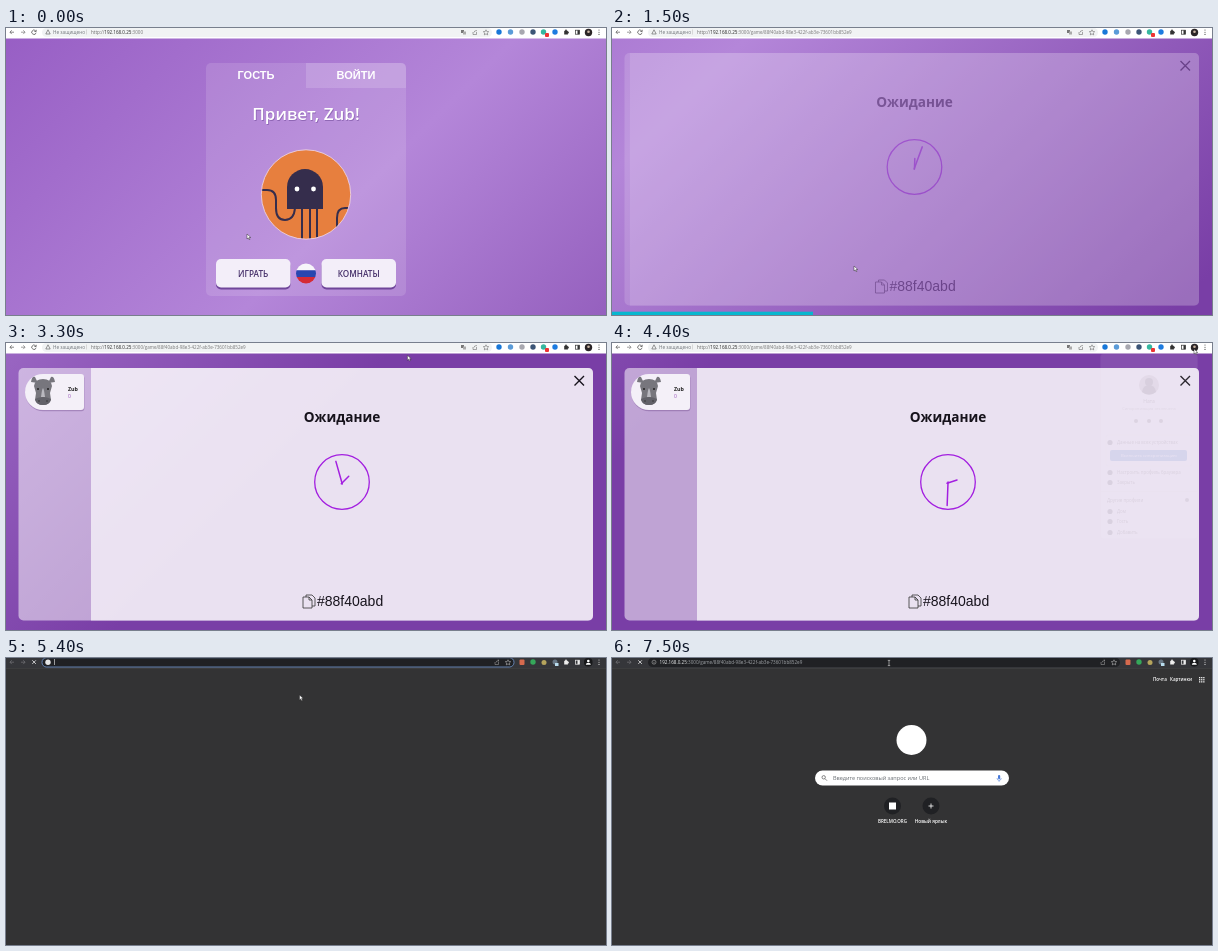
Animation, 600 px wide and 287 px high, one loop 8 s. Source, as an HTML page:

```html
<!DOCTYPE html>
<html lang="ru">
<head>
<meta charset="utf-8">
<title>Комната ожидания</title>
<style>
html, body { margin: 0; width: 100%; height: 100%; overflow: hidden; background: #333; }
svg { display: block; width: 100vw; height: 100vh; }
text { font-family: "Open Sans", "Noto Sans", sans-serif; white-space: pre; }
.arial { font-family: "Liberation Sans", sans-serif; }
</style>
</head>
<body>
<svg id="stage" viewBox="0 0 600 287"></svg>
<script>
const LOOP = 8000;
const HOST = '192.168.0.25';
const ROOM = '/game/88f40abd-98e3-422f-ab3e-73601bb852e9';
const PLAYER = 'Zub';

const text = (x, y, s, size, fill, more = '') =>
  `<text x="${x}" y="${y}" font-size="${size}" fill="${fill}" ${more}>${s}</text>`;
const rect = (x, y, w, h, fill, more = '') =>
  `<rect x="${x}" y="${y}" width="${w}" height="${h}" fill="${fill}" ${more}/>`;
const disc = (x, y, r, fill, more = '') =>
  `<circle cx="${x}" cy="${y}" r="${r}" fill="${fill}" ${more}/>`;
const line = (d, color, width = 1, more = '') =>
  `<path d="${d}" fill="none" stroke="${color}" stroke-width="${width}" ${more}/>`;
const group = (id, content, more = '') => `<g id="${id}" ${more}>${content}</g>`;
const MID = 'text-anchor="middle"';
const BOLD = 'font-weight="700"';
const SEMI = 'font-weight="600"';

const reloadIcon = color => line('M29.6 2.8A2.2 2.2 0 1 0 30.1 4.7M30.2 1.8V3.5H28.4', color, .7);
const stopIcon = color => line('M26.3 2.3l3.6 3.6M29.9 2.3l-3.6 3.6', color, .8);
const arrows = (back, next) =>
  line('M8 4.2H4M5.8 2.3L3.9 4.2 5.8 6.1', back, .7) +
  line('M15 4.2h4M17.2 2.3l1.9 1.9-1.9 1.9', next, .7);
const pageTools = color =>
  line('M489 4v2.5h3.5V4M490 4.5q0-2 3-2M491.8 1.5l1.2 1-1.2 1', color, .5);
const star = (x, color) =>
  line(`M${x} 1.8l.8 1.7 1.9.2-1.4 1.3.4 1.9-1.7-1-1.7 1 .4-1.9-1.4-1.3 1.9-.2z`, color, .5);
const menuDots = color => [2, 4.2, 6.4].map(y => disc(593, y, .55, color)).join('');
const puzzle = (x, color) => rect(x - 1.8, 2.8, 3.7, 3.7, color) + disc(x, 2.5, .9, color) + disc(x + 2, 4.5, .9, color);
const panelIcon = (x, color) => rect(x - 2, 2.2, 4, 4, 'none', `stroke="${color}" stroke-width=".7"`) + rect(x, 2.2, 2, 4, color);

function lightBar() {
  const badges = [[493, '#1877d8'], [504.5, '#5a9bd8'], [516, '#a8a8b0'], [527, '#3c5577'], [537.5, '#36b7a0'], [549, '#1d7be0']];
  return rect(0, 0, 600, 10.5, '#fff') + rect(36, 0, 450, 9, '#f1f3f4', 'rx="4.5"') +
    arrows('#555', '#777') + reloadIcon('#444') +
    line('M42 1.8l2.2 4.2h-4.4z', '#555', .6) +
    text(47, 6, 'Не защищено', 4.7, '#70757a') + rect(80, 1.5, .5, 5, '#bbb') +
    text(85, 6, `<tspan fill="#666">http://</tspan>${HOST}<tspan fill="#777">:3000</tspan><tspan id="path" fill="#777"></tspan>`, 4.55, '#222') +
    rect(455, 2, 3, 3, '#777') + rect(457, 3.5, 3, 3, '#aaa') +
    line('M467 4v2.5h3.5V4M468 4.5q0-2 3-2', '#555', .5) + star(480, '#555') +
    badges.map(([x, c]) => disc(x, 4, 2.7, c)).join('') + rect(539, 5, 4, 4, '#e33', 'rx="1"') +
    puzzle(560, '#333') + panelIcon(571.5, '#333') +
    disc(582.5, 4.5, 3.7, '#2b2527') + disc(582.5, 3.7, 1.3, '#c9b5a4') + menuDots('#444');
}

function avatar() {
  const ink = '#352d4c';
  const legs = [296, 304, 311].map(x => `M${x} 180V212`).join('');
  return `<clipPath id="round"><circle cx="300" cy="166.5" r="44.5"/></clipPath>` +
    disc(300, 166.5, 44.5, '#e77f3e') +
    `<g clip-path="url(#round)">` +
    line('M254 162h7q9 0 9 10v8q0 12 9 12t10-12M331 200v-10q0-10 8-10h6' + legs, ink, 2) +
    `<path d="M281 181V159a18 18 0 0 1 36 0V181z" fill="${ink}"/>` +
    disc(291, 161, 2.4, '#fff') + disc(307.5, 161, 2.4, '#fff') + '</g>' +
    disc(300, 166.5, 44.7, 'none', 'stroke="#f4d9dd" stroke-width=".8"');
}

function button(id, x, label) {
  return rect(x, 233, 74.5, 28.5, '#5d348a', 'rx="5" opacity=".8"') +
    rect(x, 231, 74.5, 28.5, '#f3eef9', `id="${id}" rx="5"`) +
    text(x + 37.2, 248.8, label, 8.2, '#46306a', MID + SEMI);
}

function lobby() {
  return rect(200, 35, 200, 233, '#fff', 'rx="5" opacity=".13"') +
    '<path d="M300 35h95q5 0 5 5v20H300z" fill="#fff" opacity=".15"/>' +
    text(250, 51, 'ГОСТЬ', 11, '#fff', `class="arial" ${MID}${BOLD}`) +
    text(350, 51, 'ВОЙТИ', 11, '#fff', `class="arial" ${MID}${BOLD}`) +
    text(300.6, 93, `Привет, ${PLAYER}!`, 17, '#553080', `${MID}${SEMI} opacity=".4"`) +
    text(300, 92, `Привет, ${PLAYER}!`, 17, '#fff', MID + SEMI) + avatar() +
    button('play', 210, 'ИГРАТЬ') + button('rooms', 315.5, 'КОМНАТЫ') +
    '<clipPath id="flag"><circle cx="300" cy="245.5" r="10"/></clipPath><g clip-path="url(#flag)">' +
    rect(290, 235, 20, 7.5, '#f7f5fa') + rect(290, 242.3, 20, 6.7, '#2946b0') + rect(290, 249, 20, 7, '#d52b35') + '</g>';
}

function rhino() {
  return '<g fill="#77767d"><path d="M25 39q1-6 4-5l3 6zM49 39q-1-6-4-5l-3 6z"/>' +
    '<path d="M28 43q1-7 9-7t9 7l-2 7 1 7q-2 5-8 5t-8-5l1-7z"/></g>' +
    '<path d="M35 54q1-8 2-9 1 1 2 9z" fill="#b9b8bf"/><path d="M29 56q8-4 16 0-1 6-8 6t-8-6z" fill="#626169"/>' +
    disc(32, 46, 1, '#222') + disc(42, 46, 1, '#222') + disc(33, 58, .8, '#333') + disc(41, 58, .8, '#333');
}

function game() {
  const card = 'M37 31H75q3 0 3 3V64q0 3-3 3H37a18 18 0 0 1 0-36z';
  const waiting =
    text(0, 79, 'Ожидание', 13.6, '#17131c', MID + BOLD) +
    disc(0, 139, 27.3, 'none', 'stroke="#a31fe0" stroke-width="1.3"') +
    line('M0 141V117.5', '#a31fe0', 1.5, 'id="minute" stroke-linecap="round"') +
    line('M0 141V130.5', '#a31fe0', 1.5, 'id="hour" stroke-linecap="round"') +
    line('M-36 254v-2h6l3 3v8h-3M-39 254h6l3 3v8h-9zM-33 254v3h3', '#333', .8) +
    text(-25, 263, '#88f40abd', 14, '#17131c', 'class="arial"');
  return rect(12.5, 25, 574.5, 252.5, '#fff', 'rx="5" opacity=".52"') +
    '<path id="main" fill="#fff" opacity=".68"/>' +
    group('member', `<path d="${card}" transform="translate(.4 1.3)" fill="#61397f" opacity=".35"/><path d="${card}" fill="#f4f0f8"/>` +
      rhino() + text(62, 47.5, PLAYER, 5.3, '#222', BOLD) + text(62, 54.5, '0', 5, '#9a55bb')) +
    group('waiting', waiting) + line('M568.5 33l9.5 9.5M578 33l-9.5 9.5', '#17131c', 1.4);
}

function profileMenu() {
  const row = (y, s) => disc(498, y - 1.5, 2.6, '#3c4043') + text(505, y, s, 4.4, '#333');
  return rect(488.5, 11, 97, 185, '#fff', 'rx="3" stroke="#ccc" stroke-width=".5"') +
    disc(537, 42, 10, '#a09a9d') + disc(537, 39, 4, '#2d282b') + '<path d="M530 49q1-7 7-7t7 7q-7 5-14 0z" fill="#2d282b"/>' +
    text(537, 60, 'Ната', 5, '#222', MID) + text(537, 67, 'Синхронизация отключена', 4, '#777', MID) +
    [524, 537, 549].map(x => disc(x, 78, 2, '#555')).join('') +
    rect(494, 92, 86, 31, 'none', 'rx="2" stroke="#ddd" stroke-width=".5"') +
    row(101, 'Данные на всех устройствах') + rect(498, 107, 77, 11, '#1a62c6', 'rx="2"') +
    text(537, 114, 'Включить синхронизацию', 4.3, '#fff', MID) +
    row(131, 'Настроить профиль браузера') + row(141, 'Закрыть') + rect(489, 148, 96, .5, '#ddd') +
    text(495, 159, 'Другие профили', 4.5, '#333') + disc(575, 157, 2, '#666') +
    row(170, 'Дом') + row(180, 'Гость') + row(191, 'Добавить');
}

function darkBar() {
  return rect(0, 0, 600, 10, '#35363a') + rect(0, 10, 600, .5, '#454649') + arrows('#75767a', '#75767a') +
    group('reload', reloadIcon('#ddd')) + group('stop', stopIcon('#eee')) +
    rect(36, -.3, 472, 9.3, '#202124', 'id="field" rx="4.5"') +
    pageTools('#aaa') + star(502, '#ccc') +
    rect(513.5, 1.5, 5, 5.5, '#d66a4e', 'rx="1"') + disc(527, 4, 2.7, '#35a85a') +
    disc(538, 4.5, 2.5, '#b5a45c') + disc(549, 4, 2.5, '#687785') + rect(549, 5, 3.5, 3, '#b8dcee') +
    puzzle(560, '#eee') + panelIcon(571.5, '#eee') + rect(578, 0, 8.5, 8.5, '#17181a', 'rx="4"') +
    disc(582.3, 3, 1.3, '#fff') + '<path d="M579.8 6.7q0-2 2.5-2t2.5 2z" fill="#fff"/>' + menuDots('#ddd');
}

function newTab() {
  const dots = Array.from({ length: 9 }, (_, i) => rect(587 + i % 3 * 2.1, 19 + (i / 3 | 0) * 2.1, 1.3, 1.3, '#eee')).join('');
  return text(541, 23.3, 'Почта', 4.5, '#fff', SEMI) + text(558, 23.3, 'Картинки', 4.5, '#fff', SEMI) + dots +
    disc(299.5, 82, 15, '#fff') + rect(203, 112.5, 194, 15, '#fff', 'rx="7.5"') +
    disc(211.7, 119.3, 1.7, 'none', 'stroke="#555" stroke-width=".7"') + line('M213 120.7l2 2', '#555', .7) +
    text(221, 122, 'Введите поисковый запрос или URL', 5.5, '#656a6f') +
    rect(386, 117, 2.2, 4.2, '#4779d9', 'rx="1.1"') + line('M385 120q0 2.3 2.1 2.3t2.1-2.3M387.1 122.3v1.5', '#4779d9', .6) +
    disc(280.5, 148, 8.5, '#202124') + rect(277, 144.5, 7, 7, '#fff') +
    disc(319, 148, 8.5, '#202124') + line('M316.5 148h5M319 145.5v5', '#fff', .8) +
    text(280.5, 165.3, 'BRELMO.ORG', 4.5, '#fff', MID + SEMI) + text(319, 165.3, 'Новый ярлык', 4.7, '#fff', MID + SEMI);
}

function dropdown(id, rows) {
  const bottom = 13.1 * rows.length + 26.5 - 13.1;
  const shade = rect(33, 1, 478, bottom + 1, '#111', 'rx="4" opacity=".5"');
  const list = rows.map(([s, note = ''], i) => {
    const y = 17 + 13.1 * i;
    return disc(42, y, 2.2, 'none', 'stroke="#9aa0a6" stroke-width=".6"') + line(`M42 ${y - 1.2}v1.4h1.1`, '#9aa0a6', .5) +
      text(51.5, y + 1.7, `${s}<tspan fill="#9aa0a6">${note}</tspan>`, 4.7, '#e8eaed');
  });
  return group(id, shade + rect(34, -4, 476, bottom + 4, '#202124', 'rx="4"') + rect(36, 9.5, 472, .4, '#3c4043') + list.join(''));
}

const history = [
  ['gentle reading about bird in snow', '  - Поиск Zumbri'], ['how baking gives us bread'],
  ['gentle reading about bird in snow'], ['gentle reading lesson about bird in snow'],
  ['decoration guidelines'], ['srome..69i57j0i271l3j69i60l2.2953j0j4&amp;sourceid=chrome&amp;ie=utf-8'],
  ['день студента план парк'], ['день студента план cgbcjr']
];
const fullUrl = `http://${HOST}:3000${ROOM}`;

const stage = document.getElementById('stage');
stage.innerHTML =
  `<linearGradient id="sky" gradientUnits="userSpaceOnUse"><stop stop-color="#8d50bd"/>
   <stop offset=".5" stop-color="#b486d9"/><stop offset="1" stop-color="#793ea6"/></linearGradient>` +
  group('light', rect(0, 0, 600, 287, 'url(#sky)') + group('lobby', lobby()) + group('game', game()) +
    rect(0, 283.7, 0, 3.3, '#08b7cf', 'id="loading"') + lightBar() + group('profiles', profileMenu())) +
  group('dark', rect(0, 0, 600, 287, '#333334') + group('tab', newTab()) + darkBar() +
    dropdown('recent', history) + dropdown('pasted', [[fullUrl], [fullUrl, '  - Поиск Zumbri']]) +
    disc(42, 4.2, 2.7, '#e6e6e6', 'id="engine"') +
    group('info', disc(42, 4.2, 2, 'none', 'stroke="#aaa" stroke-width=".6"') + line('M42 3.8v1.7', '#aaa', .6)) +
    text(47.5, 6, '', 4.6, '#a0a4a8', 'id="address"') + rect(0, 1, .6, 6, '#eee', 'id="caret"')) +
  group('arrow', '<path d="M0 0v5l1.2-1.1.9 1.8.9-.4-.9-1.8h1.7z" fill="#fff" stroke="#222" stroke-width=".45"/>') +
  group('beam', line('M-1.2 -2.6h2.4M0 -2.6v5.2M-1.2 2.6h2.4', '#ddd', .6));

const ui = Object.fromEntries([...stage.querySelectorAll('[id]')].map(e => [e.id, e]));
const set = (id, attrs) => Object.entries(attrs).forEach(([k, v]) => ui[id].setAttribute(k, v));
const fade = (id, opacity) => set(id, { opacity, display: opacity > 0 ? 'inline' : 'none' });
const show = (id, on) => fade(id, on ? 1 : 0);
const ramp = (t, a, b) => Math.min(1, Math.max(0, (t - a) / (b - a)));
const smooth = k => k * k * (3 - 2 * k);

// Pointer waypoints: time, x, y
const trail = [[0, 241, 206], [250, 241, 206], [800, 242, 238], [1550, 242, 238], [2150, 283, 15],
  [2700, 300, 14], [3500, 420, 12], [4250, 582, 6], [4500, 582, 6], [4900, 506, 177], [5100, 506, 177],
  [5400, 293.5, 37], [5600, 293.5, 37], [5950, 277, 5], [LOOP, 277, 5]];

function pointer(t) {
  const i = Math.max(1, trail.findIndex(p => p[0] > t));
  const [a, b] = [trail[i - 1], trail[i]];
  const k = smooth(ramp(t, a[0], b[0]));
  return [a[1] + (b[1] - a[1]) * k, a[2] + (b[2] - a[2]) * k];
}

function renderRoom(t) {
  const peak = 520 - t / 4;
  const [from, to] = [(peak - 700) / 2, (peak + 700) / 2];
  set('sky', { x1: from, y1: from, x2: to, y2: to });
  fade('lobby', 1 - ramp(t, 950, 1300));
  set('play', { fill: t > 600 ? '#e5daf1' : '#f3eef9' });
  fade('game', ramp(t, 1400, 1750));
  const edge = 12.5 + 72.5 * smooth(ramp(t, 1400, 2000));
  set('main', { d: `M${edge} 25H582q5 0 5 5V272.5q0 5-5 5H${edge}z` });
  set('waiting', { transform: `translate(${(edge + 587) / 2})` });
  set('minute', { transform: `rotate(${20 + (t - 1500) * .18} 0 140)` });
  set('hour', { transform: `rotate(${2 + (t - 1500) * .024} 0 140)` });
  fade('member', ramp(t, 1700, 2000));
  set('loading', { width: t < 1900 ? 600 * ramp(t, 1300, 1900) : 0 });
  ui.path.textContent = t < 1300 ? '' : ROOM;
  fade('profiles', ramp(t, 4385, 4560) * (1 - ramp(t, 5080, 5180)));
}

function renderBrowser(t) {
  const loaded = t >= 5700;
  const typed = t >= 6475;
  const sent = t >= 7200;
  fade('dark', ramp(t, 5150, 5300));
  show('tab', loaded);
  show('reload', loaded && !sent);
  show('stop', !loaded || sent);
  set('field', { stroke: sent ? 'none' : '#7197d0', 'stroke-width': .8 });
  show('recent', t >= 6000 && !typed);
  fade('pasted', typed ? 1 - ramp(t, 7200, 7300) : 0);
  show('engine', !typed);
  show('info', typed);
  ui.address.innerHTML = !typed ? '' :
    `${sent ? '' : 'http://'}<tspan fill="#f1f3f4">${HOST}</tspan>:3000${ROOM}`;
  set('caret', { x: typed ? 48.5 + ui.address.getComputedTextLength() : 48 });
  show('caret', !sent && (t < 6950 || t < 5200));
}

function render(t) {
  renderRoom(t);
  renderBrowser(t);
  const [x, y] = pointer(t);
  const beam = t >= 5900;
  show('arrow', !beam);
  show('beam', beam);
  set(beam ? 'beam' : 'arrow', { transform: `translate(${x} ${y})` });
}

const start = performance.now();
function tick() {
  render((performance.now() - start) % LOOP);
  requestAnimationFrame(tick);
}
tick();
</script>
</body>
</html>
```
